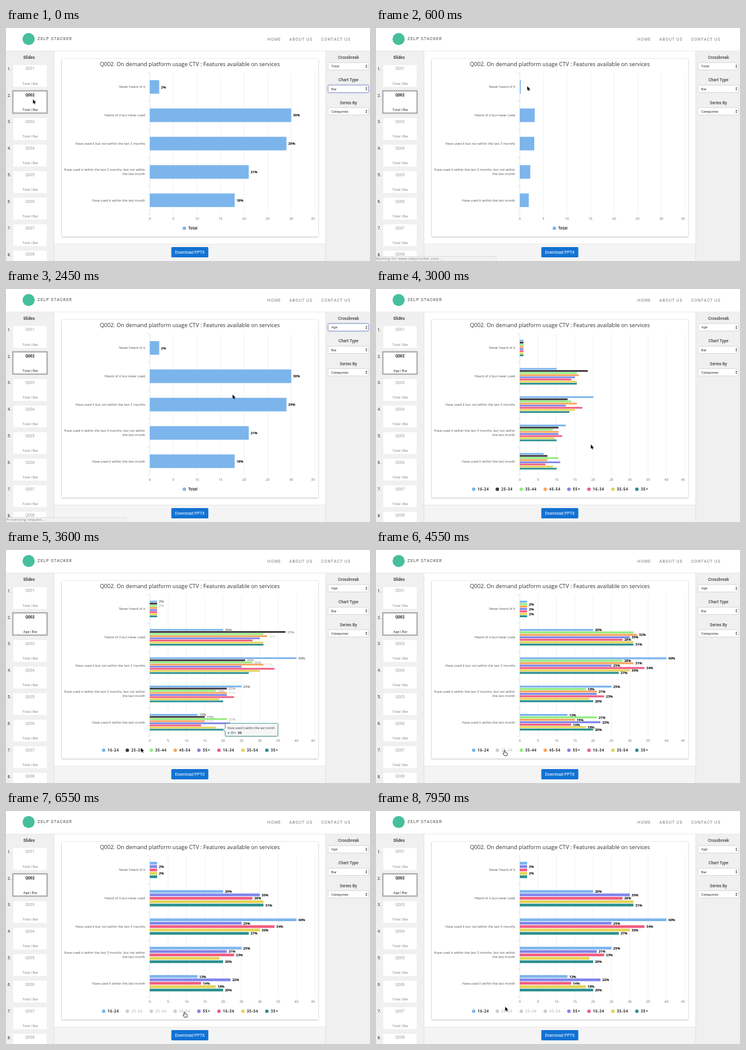
Recreate the animation shown at these times as an HTML page. Size 600x385 px, loop 8 s.

```html
<!DOCTYPE html>
<html lang="en">
<head>
<meta charset="utf-8">
<title>Survey charts</title>
<style>
  html, body { margin: 0; width: 100%; height: 100%; overflow: hidden; background: #fff; }
  svg { display: block; width: 100%; height: 100%; }
  .ui { font-family: Roboto, sans-serif; }
  .chart { font-family: "Open Sans", sans-serif; }
</style>
</head>
<body>
<svg id="stage" viewBox="0 0 600 385">
  <defs>
    <filter id="shadow" x="-5%" y="-5%" width="110%" height="112%">
      <feDropShadow dx="0" dy=".6" stdDeviation="1" flood-opacity=".4"/>
    </filter>
    <filter id="glow" x="-10%" y="-40%" width="120%" height="180%">
      <feDropShadow dx="0" dy="0" stdDeviation=".9" flood-color="#7d8fd0"/>
    </filter>
  </defs>
  <g id="page"></g>
  <g id="live"></g>
</svg>
<script>
const LOOP = 8000;
const PLOT = { x: 237, y: 74, w: 272, h: 234 };
const BAND = PLOT.h / 5;
const RELOAD = 390, SPLIT = 2500, GROW = 1000;

const categories = [
  ['Never heard of it'],
  ['Heard of it but never used'],
  ['Have used it but not within the last 3 months'],
  ['Have used it within the last 3 months, but not within', 'the last month'],
  ['Have used it within the last month']
];
const total = [{ name: 'Total', color: '#7cb5ec', data: [2, 30, 29, 21, 18], dot: 294, tags: '11111' }];
// tags: which data labels stay visible; hide: when the legend item is clicked
const ages = [
  { name: '16-24', color: '#7cb5ec', data: [2, 20, 40, 25, 13], dot: 161, tags: '01111' },
  { name: '25-34', color: '#38383d', data: [2, 37, 26, 21, 15], dot: 200, tags: '01111', hide: 3750 },
  { name: '35-44', color: '#90ed7d', data: [2, 31, 28, 18, 21], dot: 239.5, tags: '10111', hide: 5620 },
  { name: '45-54', color: '#f7a35c', data: [2, 32, 31, 21, 15], dot: 279, tags: '01111', hide: 6020 },
  { name: '55+', color: '#8085e9', data: [2, 30, 25, 21, 22], dot: 318, tags: '11101' },
  { name: '16-34', color: '#f15c80', data: [2, 28, 34, 23, 14], dot: 351, tags: '01111' },
  { name: '35-54', color: '#e4d354', data: [2, 31, 30, 19, 18], dot: 390.5, tags: '10101' },
  { name: '35+', color: '#2b908f', data: [2, 31, 27, 20, 20], dot: 430, tags: '01111' }
];
// pointer tip: time, x, y
const path = [
  [0, 44.5, 118], [250, 44.5, 118], [1050, 551, 64], [1250, 551, 64], [1850, 549, 72],
  [2400, 373.5, 174.5], [2600, 373.5, 174.5], [3250, 345, 296], [3400, 340, 297],
  [3600, 222.5, 327], [3720, 212, 331], [5150, 212, 331], [5500, 256, 330.5],
  [5750, 256, 330.5], [5980, 294.5, 332], [7050, 294.5, 332], [7750, 226, 318], [7950, 213, 323.5]
];

const clamp = v => Math.max(0, Math.min(1, v));
const ease = v => .5 - Math.cos(Math.PI * clamp(v)) / 2;
const fade = (t, from, to, out) => Math.min(clamp((t - from) / 80), clamp((out - t) / (out - to)));

const rect = (x, y, w, h, fill, more = '') =>
  `<rect x="${x}" y="${y}" width="${w}" height="${h}" fill="${fill}" ${more}/>`;
const line = (x1, y1, x2, y2, color, width = .6) =>
  `<path d="M${x1} ${y1}L${x2} ${y2}" stroke="${color}" stroke-width="${width}"/>`;
const dot = (x, y, r, fill) => `<circle cx="${x}" cy="${y}" r="${r}" fill="${fill}"/>`;
const text = (x, mid, s, size, fill, more = '') =>
  `<text x="${x}" y="${mid + size * .36}" font-size="${size}" fill="${fill}" ${more}>${s}</text>`;
const MIDDLE = 'text-anchor="middle"', END = 'text-anchor="end"', BOLD = 'font-weight="700"';

function page() {
  const nav = 'letter-spacing=".95"';
  let s = rect(0, 0, 600, 385, '#fff')
    + rect(0, 38, 79, 347, '#f0f0f0') + rect(527, 38, 73, 347, '#f0f0f0')
    + rect(79, 357, 448, 28, '#f4f4f4')
    + line(0, 38, 600, 38, '#dcdcdc') + line(79, 38, 79, 385, '#d4d4d4')
    + line(527, 38, 527, 385, '#d4d4d4') + line(79, 357, 527, 357, '#d9d9d9')
    + dot(37.3, 18.3, 10, '#45bf9c')
    + text(52, 18, 'ZELP STACKER', 6.6, '#444', 'letter-spacing="1"')
    + text(431, 18.5, 'HOME', 6.6, '#777', nav)
    + text(467, 18.5, 'ABOUT US', 6.6, '#777', nav)
    + text(519.5, 18.5, 'CONTACT US', 6.6, '#777', nav)
    + text(38, 48.7, 'Slides', 6.8, '#444', MIDDLE + BOLD);

  for (let i = 0; i < 8; i++) {
    const y = 67.2 + i * 43.85, on = i === 1;
    s += on ? rect(11.3, 103.8, 56.4, 36.8, '#fff', 'stroke="#a6a6a6" stroke-width="2"')
            : rect(12, y - 6, 55, 36, '#fff');
    s += text(2.5, y, i + 1 + '.', 7, '#333')
      + text(39.5, y, 'Q00' + (i + 1), 6.3, on ? '#222' : '#999', MIDDLE + (on ? BOLD : ''));
    if (!on) s += text(40, y + 24.3, 'Total | Bar', 5.8, '#888', MIDDLE);
  }
  ['Crossbreak', 'Chart Type', 'Series By'].forEach((name, i) => {
    s += text(564.5, 48.7 + i * 37.2, name, 6.8, '#444', MIDDLE + 'font-weight="500"');
  });
  s += rect(272.5, 362, 61, 17, '#1272d3', 'rx="1.5"')
    + text(303, 370.3, 'Download PPTX', 6.85, '#fff', MIDDLE)
    + rect(92, 51, 422.5, 293.5, '#fff', 'filter="url(#shadow)"');
  return `<g class="ui">${s}</g>`;
}

function select(i, value, focus) {
  const y = 57.3 + i * 37.2, m = y + 6;
  return rect(531, y, 66.5, 12, '#fff',
      `rx="1.5" stroke="${focus ? '#8794c4' : '#ccc'}" stroke-width=".7" ${focus ? 'filter="url(#glow)"' : ''}`)
    + text(536, m, value, 5.9, '#333')
    + `<path d="M592.5 ${m - .7}l1.5-2.1 1.5 2.1zm0 1.4l1.5 2.1 1.5-2.1z" fill="#333"/>`;
}

function axes(max) {
  const bottom = PLOT.y + PLOT.h;
  let s = text(303, 59.7, 'Q002. On demand platform usage CTV : Features available on services', 9.12, '#333', MIDDLE);
  for (let v = 0; v <= max; v += 5) {
    const x = PLOT.x + PLOT.w * v / max;
    if (v) s += line(x, PLOT.y, x, bottom, '#e8e8e8');
    s += text(v === max ? 506 : x, 315, v, 5.6, '#666', MIDDLE);
  }
  s += line(PLOT.x, PLOT.y, PLOT.x, bottom, '#ccd2dc');
  for (let i = 0; i <= 5; i++) s += line(232.5, PLOT.y + i * BAND, PLOT.x, PLOT.y + i * BAND, '#ccd2dc');
  categories.forEach((rows, i) => rows.forEach((row, k) => {
    const y = PLOT.y + (i + .5) * BAND + (k - (rows.length - 1) / 2) * 7;
    s += text(229.5, y, row, 5.52, '#555', END);
  }));
  return s;
}

function chart(t) {
  const split = t >= SPLIT, list = split ? ages : total, max = split ? 45 : 35;
  const start = split ? SPLIT : t < RELOAD ? -3000 : RELOAD;
  const grow = ease((t - start) / GROW);
  const gone = s => s.hide && t >= s.hide;
  const weights = list.map(s => s.hide ? 1 - ease((t - s.hide) / 500) : 1);
  const slot = BAND * .6 / weights.reduce((a, b) => a + b);
  let bars = '', tags = '', legend = '', used = 0;

  list.forEach((s, i) => {
    const offset = (used + weights[i] / 2) * slot - BAND * .3;
    const shown = clamp((t - start - GROW - i * 25) / 200);
    used += weights[i];
    const tint = gone(s) ? '#ccc' : s.color;
    legend += dot(s.dot, 330.8, 2.9, tint)
      + text(s.dot + 6.5, 331, s.name, 6.1, gone(s) ? '#ccc' : '#333',
        BOLD + (split ? ' letter-spacing=".6"' : ''));
    if (gone(s)) return;
    s.data.forEach((v, k) => {
      const y = PLOT.y + (k + .5) * BAND + offset;
      const w = PLOT.w * v / max * grow;
      bars += rect(PLOT.x, y - slot * .4, w, slot * .8, s.color);
      const early = split && i === 0 && k === 0 && t < 3750;
      const freed = i === 4 && k === 3 && t >= ages[3].hide;
      if (shown && (s.tags[k] === '1' || early || freed))
        tags += text(PLOT.x + w + 3, y + .2, v + '%', 5.5, '#000',
          `${BOLD} opacity="${shown}" stroke="#fff" stroke-width=".9" paint-order="stroke"`);
    });
  });
  return `<g class="chart">${axes(max)}${bars}${tags}${legend}${tooltip(t)}</g>`;
}

function tooltip(t) {
  const o = fade(t, 3300, 3800, 4000);
  if (!o) return '';
  return `<g opacity="${o}"><path d="M363 286.5H446.5q1.5 0 1.5 1.5V306q0 1.5-1.5 1.5H363q-1.5 0-1.5-1.5V300L358.5 297 361.5 294V288q0-1.5 1.5-1.5z"
    fill="#f9f9f9" fill-opacity=".94" stroke="#2b908f" stroke-width=".7" filter="url(#shadow)"/>`
    + text(365, 294.5, 'Have used it within the last month', 4.93, '#333')
    + dot(366.8, 302.2, 1.2, '#2b908f')
    + text(369.7, 302, `35+: <tspan ${BOLD}>20</tspan>`, 5.5, '#333') + '</g>';
}

function status(t) {
  const early = t < 1500;
  const o = early ? fade(t, 300, 1000, 1170) : fade(t, 2350, 2700, 2850);
  if (!o) return '';
  return `<g class="chart" opacity="${o}">` + rect(-1, 377.5, 199, 9, '#f1f1f1', 'stroke="#d2d2d2" stroke-width=".6"')
    + text(0, 381.3, early ? 'Waiting for www.zelpstacker.com...' : 'Processing request...', 6, '#777',
      'letter-spacing=".36"') + '</g>';
}

function pointer(t) {
  let i = 0;
  while (i < path.length - 2 && t >= path[i + 1][0]) i++;
  const [t0, x0, y0] = path[i], [t1, x1, y1] = path[i + 1];
  const k = ease((t - t0) / (t1 - t0));
  const at = `transform="translate(${x0 + (x1 - x0) * k} ${y0 + (y1 - y0) * k})"`;
  const hand = t > 3680 && t < 7150;
  return hand
    ? `<path ${at} d="M-1 .6Q0-.6 .9.6V3.2L3.8 4Q4.8 4.4 4.6 5.4L3.9 8.8H-.4L-2.8 5.4Q-2.9 4.3-1 5.3z"
        fill="#fff" stroke="#111" stroke-width=".8" stroke-linejoin="round"/>`
    : `<path ${at} d="M0 0V7L1.6 5.5 2.7 8 3.9 7.5 2.8 5.1H5z" fill="#000" stroke="#fff" stroke-width=".6" paint-order="stroke"/>`;
}

const live = document.getElementById('live');
document.getElementById('page').innerHTML = page();

function draw(t) {
  const panel = text(40, 135.3, t < SPLIT ? 'Total | Bar' : 'Age | Bar', 5.8, '#333', MIDDLE)
    + select(0, t < 1900 ? 'Total' : 'Age', t >= 1900 && t < 2560)
    + select(1, 'Bar', t < 300)
    + select(2, 'Categories', false);
  live.innerHTML = `<g class="ui">${panel}</g>` + chart(t) + status(t) + pointer(t);
}

const begin = performance.now();
function tick() {
  draw((performance.now() - begin) % LOOP);
  requestAnimationFrame(tick);
}
tick();
</script>
</body>
</html>
```
